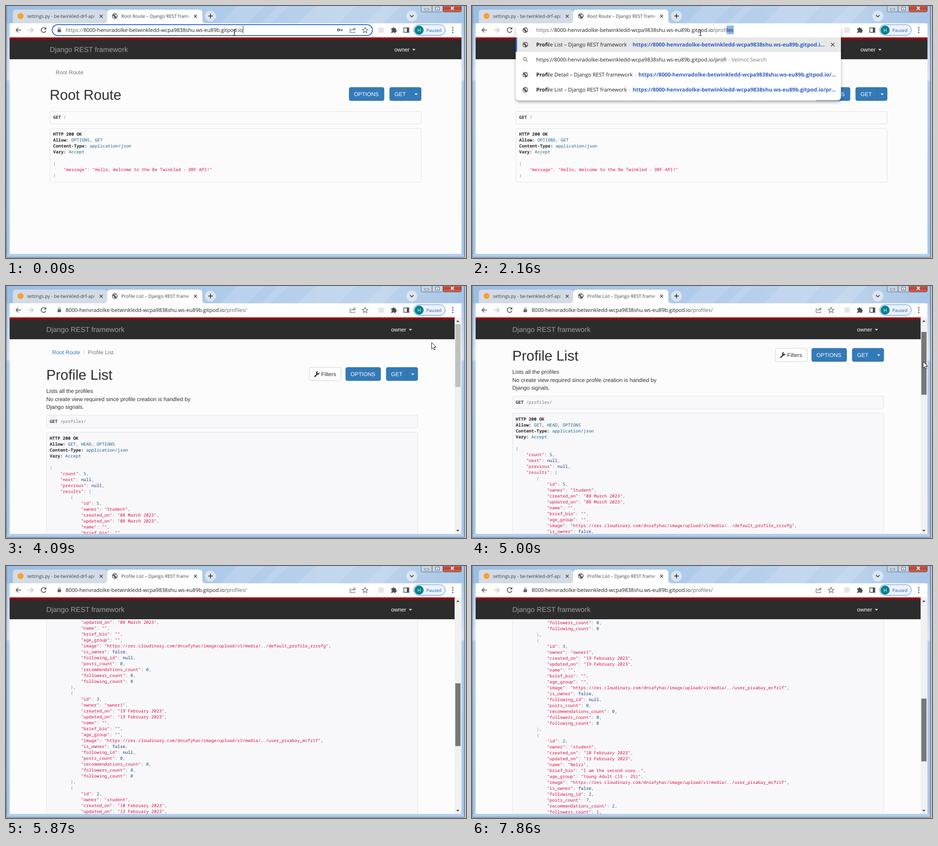
An HTML page for the animation above (8 s loop, 1010 px wide and 554 px high).

```html
<!DOCTYPE html>
<html lang="en">
<head>
<meta charset="utf-8">
<title>Profile API walkthrough</title>
<style>
html, body { margin: 0; width: 100%; height: 100%; overflow: hidden; background: #fcfcfc; }
svg { display: block; }
text { white-space: pre; text-rendering: geometricPrecision; }
.ui { font-family: "Open Sans", "Noto Sans", sans-serif; }
.web { font-family: "Liberation Sans", Arial, sans-serif; }
.mono { font-family: "Noto Sans Mono", "DejaVu Sans Mono", monospace; font-size: 9.54px; }
.b { font-weight: 700; }
.str { fill: #dd1144; }
.num { fill: #195f91; }
.kwd { fill: #1e347b; }
.pun { fill: #8a9292; }
.sep { fill: #66626a; }
.line { fill: none; stroke: #4a4d51; stroke-width: 1.6; }
.thin { fill: none; stroke: #5f6368; stroke-width: 1.2; }
#drop { filter: drop-shadow(0 4px 3px rgba(0, 0, 0, .3)); }
</style>
</head>
<body>
<svg id="stage" width="1010" height="554" viewBox="0 0 1010 554"></svg>
<script>
const LOOP = 8000;
const HOST = '8000-henvradolke-betwinkledd-wcpa9838shu.ws-eu89b.gitpod.io';
const TOP = 84, THUMB = 138, RATIO = 3.453, END = 1063.5;

// [time, typed path]
const TYPING = [[0, ''], [800, '/'], [1300, '/p'], [1420, '/pr'], [1670, '/pro'], [1970, '/prof'],
  [2160, '/profi'], [2380, '/profil'], [2500, '/profile'], [2740, '/profiles']];
// [time, scroll, thumb top if it runs ahead]
const SCROLL = [[0, 0], [4820, 4], [4885, 14], [4950, 26], [5000, 42, 101], [5060, 80], [5130, 150],
  [5210, 230], [5380, 300], [5440, 370], [5510, 440], [5570, 500], [5870, 600.5], [5940, 680],
  [6010, 750], [6080, 820], [6150, 870], [6380, 980], [6450, END], [7700, 930], [7780, 820], [7860, 716.5]];
// [time, x, y]
const POINTER = [[3960, 640, 75], [4030, 800, 105], [4090, 934, 124], [4330, 950, 132],
  [4400, 975, 142], [4460, 990, 149]];
const DROP_AT = 800, LOAD_AT = 3050, READY_AT = 3280, HOVER_AT = 4460, DRAG_AT = 4820, LEAVE_AT = 5380;

const $ = id => document.getElementById(id);
const at = (table, t) => table.reduce((hit, row) => row[0] <= t ? row : hit, table[0]);
const show = (id, on) => $(id).setAttribute('visibility', on ? 'inherit' : 'hidden');
const text = (cls, x, y, size, fill, s, more = '') =>
  `<text class="${cls}" x="${x}" y="${y}" font-size="${size}" fill="${fill}" ${more}>${s}</text>`;
const rect = (x, y, w, h, fill, more = '') =>
  `<rect x="${x}" y="${y}" width="${w}" height="${h}" fill="${fill}" ${more}/>`;
const path = (d, cls = 'line', more = '') => `<path class="${cls}" d="${d}" ${more}/>`;
const span = (cls, s) => `<tspan class="${cls}">${s}</tspan>`;
const tint = (fill, s) => `<tspan fill="${fill}">${s}</tspan>`;
const cross = (x, y, r, more) => path(`M${x - r} ${y - r}l${2 * r} ${2 * r}m0 ${-2 * r}l${-2 * r} ${2 * r}`, 'line', more);
const caret = (x, y) => `<path d="M${x} ${y}h7l-3.5 3.6z" fill="#fff"/>`;
const globe = (x, y, id = '') => `<g ${id && `id="${id}"`} transform="translate(${x} ${y})">
  <circle r="6" fill="#55595e"/><path fill="#fff" d="M-4.6-1.2L-1.5 1.8-.6 4.8C-3 4.6-4.8 2-4.6-1.2z
  M-2.6-3.6L.8-4.8.9-3-.8-1.6 1.8-.2 2.2 1.6 3.6 2.2C5 .2 4.6-2.6 2.8-4L2.2-2.2z"/></g>`;

function chrome() {
  let s = `<defs>
    <linearGradient id="sky"><stop offset="0" stop-color="#9dbde3"/><stop offset=".45" stop-color="#aecaea"/>
      <stop offset=".8" stop-color="#bed4ec"/><stop offset="1" stop-color="#a8c5e6"/></linearGradient>
    <linearGradient id="side" x2="0" y2="1"><stop offset="0" stop-color="#a6c3e5"/><stop offset=".29" stop-color="#d8e6f5"/>
      <stop offset=".3" stop-color="#b3cdea"/><stop offset="1" stop-color="#a9c7e8"/></linearGradient>
    <linearGradient id="red" x2="0" y2="1"><stop offset="0" stop-color="#d98b7e"/><stop offset=".5" stop-color="#bd4034"/>
      <stop offset="1" stop-color="#cf6a55"/></linearGradient>
    <linearGradient id="fade1"><stop offset="0" stop-color="#d3dbe5" stop-opacity="0"/><stop offset="1" stop-color="#d3dbe5"/></linearGradient>
    <linearGradient id="fade2"><stop offset="0" stop-color="#fff" stop-opacity="0"/><stop offset="1" stop-color="#fff"/></linearGradient>
    <clipPath id="view"><rect x="8" y="117" width="992" height="428"/></clipPath>
  </defs>`;
  s += rect(0, 0, 1010, 554, 'url(#side)') + rect(0, 0, 1010, 38, 'url(#sky)');
  for (const [x, w] of [[470, 60], [560, 22], [640, 90], [790, 40]])
    s += `<path d="M${x} 38l38-38h${w}l-38 38z" fill="#fff" opacity=".12"/>`;
  s += rect(0, 545, 1010, 9, '#b3cdea') + rect(1, 0, 1, 552, '#5d6c80') + rect(1006, 0, 1, 552, '#3f4d60') +
    rect(1, 552, 1006, 1, '#4d5c70') + rect(1007, 0, 3, 554, '#b9c6d6') + rect(0, 553, 1010, 1, '#d5dde6');
  // window buttons
  s += rect(911.5, -4, 48, 17, '#c3d3e6', 'rx="3" stroke="#5d6f86"') + rect(959.5, -4, 40, 17, 'url(#red)', 'rx="3" stroke="#5b3a3a"') +
    path('M935.5 0v13', 'thin') + rect(919, 6, 9, 3, '#fff', 'stroke="#4b5665" stroke-width=".8"') +
    rect(943.5, 2.5, 8, 6.5, '#fff', 'stroke="#4b5665"') + rect(946, 5, 3, 2, '#7d8da1') +
    cross(980, 5, 3, 'style="stroke:#fff;stroke-width:2.2"');
  // tabs
  s += `<path d="M15 38V15q0-7 7-7H215q7 0 7 7V38z" fill="#d3dbe5"/>
    <path d="M215 38q7 0 7-7V15q0-7 7-7H424q7 0 7 7V31q0 7 7 7z" fill="#fff"/>
    <circle cx="32" cy="22" r="6.5" fill="#f7a030"/>` +
    text('ui', 46, 26, 10.15, '#3c4043', 'settings.py - be-twinkled-drf-api') + rect(190, 12, 10, 20, 'url(#fade1)') +
    cross(209, 22.5, 3.2) + globe(239, 22, 'tabGlobe') +
    `<path id="spin" d="M233 22a6 6 0 0 1 6-6" fill="none" stroke="#8ab4f0" stroke-width="1.6"/>` +
    text('ui', 253, 26, 10.15, '#3c4043', '', 'id="tabTitle"') + rect(397, 12, 8, 20, 'url(#fade2)') +
    rect(405, 12, 25, 20, '#fff') + cross(416, 22.5, 3.2) +
    '<circle cx="449" cy="22" r="12" fill="#dbe5f1"/>' + path('M449 17v10M444 22h10', 'line', 'style="stroke:#222"') +
    '<circle cx="891" cy="22" r="12" fill="#dce6f2"/>' + path('M887 20l4 4 4-4', 'line', 'style="stroke:#333"');
  // toolbar
  s += rect(8, 38, 992, 31, '#fff') + path('M33 53H22m5-5l-5 5 5 5') +
    path('M48.5 53h11m-5-5l5 5-5 5', 'line', 'style="stroke:#b9bbbd"') +
    `<g id="reload">${path('M87 50a5.3 5.3 0 1 0 .6 4.4')}<path d="M88.5 46.5v5h-5z" fill="#4a4d51"/></g>` +
    `<g id="stop">${cross(82, 53, 4.3)}</g>`;
  s += rect(101.5, 41, 703, 24, '#fff', 'rx="12" stroke="#2a6fd2" stroke-width="2" id="ring"') +
    `<g id="lock">${rect(113.2, 51.5, 7.6, 6, '#5f6368', 'rx="1"')}${path('M115 52v-2a2 2 0 0 1 4 0v2', 'thin')}</g>
    <g id="info">${path('M111.5 53a5.5 5.5 0 1 0 11 0a5.5 5.5 0 1 0-11 0M117 52v4M117 49.5v1.3', 'thin')}</g>` +
    text('ui', 131, 57, 11.52, '#5f6368', '', 'id="url"') + rect(520, 43, 1, 17, '#222', 'id="caret"') +
    `<g id="key"><circle cx="730" cy="52.5" r="2.3" class="line"/>${path('M732.5 52.5h7m-2 0v3')}</g>` +
    path('M758 50.5h-2.5v8h10v-2.5M758.5 55c.5-3.5 3-4.5 7-4.5M763 47.5l4 3-4 3', 'thin') +
    path('M788.5 47l1.8 4 4.3.4-3.3 2.9 1 4.3-3.8-2.3-3.8 2.3 1-4.3-3.3-2.9 4.3-.4z', 'thin') +
    rect(817.5, 47, 12, 12, '#e6e6e6', 'rx="2"') +
    `<path fill="#4a4d51" d="M846 49h3a2 2 0 1 1 4 0h3v3.5a2 2 0 1 1 0 4V59h-3.5a1.8 1.8 0 0 0-3.5 0H846v-3a1.8 1.8 0 0 0 0-3.6z"/>` +
    rect(873.5, 48, 11, 10, 'none', 'stroke="#4a4d51" stroke-width="1.5"') + rect(880, 48, 4.5, 10, '#4a4d51') +
    rect(895, 41, 69.5, 23.5, '#ecf2fc', 'rx="11.8" stroke="#4a80d0"') +
    '<circle cx="907" cy="53" r="10" fill="#00838f"/>' + text('ui', 907, 57, 10.5, '#fff', 'H', 'text-anchor="middle"') +
    text('ui', 923, 56.5, 9.7, '#2a5db0', 'Paused');
  for (const y of [48, 53, 58]) s += `<circle cx="981" cy="${y}" r="1.4" fill="#4a4d51"/>`;
  return s;
}

const button = (x, w, label) => rect(x + .5, 179, w, 29, '#337ab7', 'rx="3.5" stroke="#3075b0"') +
  text('web', x + 11, 198, 12.1, '#fff', label);
const box = (y, h, fill) => rect(96.5, y + .5, 815, h, fill, 'rx="3.5" stroke="#e1e1e8"');
const code = (y, s) => `<text class="mono" fill="#48484c" x="103.5" y="${y}">${s}</text>`;
const paint = s => s.replace(/("[^"]*")|(\d+)|(true|false|null)|([,:])|([{}[\]])/g, (m, a, b, c, d) =>
  span(a ? 'str' : b ? 'num' : c ? 'kwd' : d ? 'sep' : 'pun', m));
const header = (k, v) => tint('#222', span('b', k + ':')) + ' ' + span('num', v);

function body(title, y, allow, json, route, height, fill) {
  const lines = [tint('#222', span('b', 'HTTP 200 OK')), header('Allow', allow),
    header('Content-Type', 'application/json'), header('Vary', 'Accept'), '', ...json.map(paint)];
  return text('web', 96, 206, 31.1, '#2f2f2f', title) + button(753, 76.5, 'OPTIONS') + button(842, 69, 'GET') +
    rect(889.5, 179.5, 1, 28, '#2e6da4') + caret(897, 192.5) +
    box(y, 28, fill) + code(y + 17.2, tint('#333', span('b', 'GET')) + ' ' + tint('#777', route)) +
    box(y + 37.5, height, fill) + lines.map((l, i) => code(y + 54.3 + i * 13, l)).join('');
}

function profile(id, owner, made, changed, name, bio, age, image, own, follow, counts) {
  const q = s => `"${s}"`;
  const fields = { id, owner: q(owner), created_on: q(made + ' 2023'), updated_on: q(changed + ' 2023'), name: q(name),
    brief_bio: q(bio), age_group: q(age),
    image: q('https://res.cloudinary.com/dnsafyhac/image/upload/v1/media/' + image),
    is_owner: own, following_id: follow, posts_count: counts[0], recommendations_count: counts[1],
    followers_count: counts[2], following_count: counts[3] };
  const rows = Object.entries(fields).map(([k, v]) => `${' '.repeat(12)}"${k}": ${v}`);
  return ['        {', ...rows.map((r, i) => i < rows.length - 1 ? r + ',' : r), id > 1 ? '        },' : '        }'];
}

function pages() {
  const none = [0, 0, 0, 0], blank = '../default_profile_rzzofg', pic = 'user_pixabay_mcfz1f';
  const march = '08 March', feb = '10 February', late = '19 February';
  const list = ['{', '    "count": 5,', '    "next": null,', '    "previous": null,', '    "results": [',
    ...profile(5, 'Student', march, march, '', '', '', blank, false, null, none),
    ...profile(4, 'Novice', march, march, '', '', '', blank, false, null, none),
    ...profile(3, 'owner1', late, late, '', '', '', '../' + pic, false, null, none),
    ...profile(2, 'student', feb, '13 February', 'Nelvi', 'I am the second user..', 'Young Adult (19 - 25)',
      '../' + pic, false, 2, [7, 2, 1, 1]),
    ...profile(1, 'owner', feb, feb, 'Henvra', 'I am the creator of this app.. I am seeking to be uplifted..:)',
      '26 - 40', 'images/' + pic, true, null, [2, 1, 1, 1]),
    '    ]', '}'];
  const hello = ['{', '    "message": "Hello, Welcome to the Be Twinkled - DRF API!"', '}'];
  const notes = ['Lists all the profiles', 'No create view required since profile creation is handled by', 'Django signals.'];
  return rect(8, 69, 992, 476, '#fcfcfc') + `<g clip-path="url(#view)">
    <g id="root">${text('web', 109, 150, 12.1, '#777', 'Root Route')}${body('Root Route', 231, 'OPTIONS, GET', hello, '/', 118.5, '#fbfbfb')}</g>
    <g id="list">${text('web', 109, 150, 12.1, '#337ab7', `Root Route${tint('#ccc', '  /  ')}${tint('#777', 'Profile List')}`)}
      ${rect(673.5, 179, 70, 29, '#fff', 'rx="3.5" stroke="#ccc"')}
      <path d="M685.5 199l5-5" stroke="#333" stroke-width="2.6" stroke-linecap="round"/>
      <path d="M693 187.5l-2 2 .5 2 2 .5 2-2a3.8 3.8 0 1 1-2.5-2.5z" fill="#333"/>
      ${text('web', 699.5, 198, 12.1, '#333', 'Filters')}
      ${notes.map((n, i) => text('web', 96, 235.3 + i * 17.3, 12.1, '#333', n)).join('')}
      ${body('Profile List', 283.5, 'GET, HEAD, OPTIONS', list, '/profiles/', 1211.5, '#f8f8fa')}</g></g>` +
    rect(8, 73, 992, 44, '#2c2c2c') + rect(8, 69, 992, 4.3, '#a30000') +
    `<g id="nav">${text('web', 96, 100.5, 15.55, '#9d9d9d', 'Django REST framework')}
      ${text('web', 853, 99.6, 12.1, '#fff', 'owner')}${caret(892, 94.5)}</g>
    <g id="bar">${rect(985, 69, 15, 476, '#f1f1f1')}<path d="M988.5 79h7l-3.5-4z" fill="#505050"/>
      <path id="down" d="M988.5 536h7l-3.5 4z"/>${rect(986.5, TOP, 11.5, THUMB, '#c1c1c1', 'id="thumb"')}</g>`;
}

const PLUS = `<g id="drop"><path id="sheet" fill="#fff"/><g id="rows"></g>${globe(117, 53)}
  <rect id="mark" y="43" height="19" fill="#8fb6ee"/>${text('ui', 141, 57, 11.52, '#5f6368', '', 'id="typed"')}</g>`;
const POINTERS = `<g id="beam">${path('M498.5 52.5q3 0 3 1.5v9.5q0 1.5-3 1.5M504.5 52.5q-3 0-3 1.5v9.5q0 1.5 3 1.5M500 59h3',
  'thin', 'style="stroke:#222"')}</g>
  <path id="arrow" d="M0 0v14.5l3.3-3.2 2.2 5.2 2.3-1-2.2-5h4.5z" fill="#fff" stroke="#111"/>`;

// everything in the open address box for one typed path
function suggest(typed) {
  const word = typed.slice(1), rest = word && 'profiles'.slice(word.length);
  const hits = 'profile'.startsWith(word) ? word.length : 0;
  const row = (name, tail) => span('b', name.slice(0, hits)) + name.slice(hits) + ' – Django REST framework' +
    `<tspan fill="#777" dx="1"> - </tspan><tspan class="b" fill="#2a5fc4" font-size="11.68" dx="2">https://${HOST.slice(0, -1)}${tail}</tspan>`;
  const search = `<tspan font-size="11.52">https://${HOST}${typed}</tspan>` + tint('#777', '<tspan dx="1"> - </tspan>Velmot Search');
  const rows = word
    ? [row('Profile List', '…'), search, row('Profile Detail', 'o/…'), row('Profile List', 'o/pr…')]
    : [row('Root Route', '…'), search, row('Profile List', 'o/pr…'), row('Profile Detail', 'o/…'), row('Profile List', 'o/pr…')];
  const h = 75.5 + rows.length * 33;
  $('sheet').setAttribute('d', `M96 49q0-8 8-8H802q8 0 8 8V${h - 8}q0 8-8 8H104q-8 0-8-8z`);
  $('rows').innerHTML = rect(96, 69, 714, 32, '#e8e8e8') + rect(96, 69, 3, 32, '#2a6fd2', 'rx="1"') + cross(792, 85, 4) +
    rows.map((r, i) => (i === 1
      ? path('M113 116.5a3.2 3.2 0 1 0 6.4 0a3.2 3.2 0 1 0-6.4 0M118.6 119l3.2 3.2', 'thin')
      : globe(117, 85 + i * 33)) + text('ui', 141, 89 + i * 33, 11.56, '#202124', r)).join('');
  const el = $('typed'), base = `https://${HOST}${typed}`;
  el.innerHTML = 'https://' + tint('#202124', HOST) + typed + tint('#202124', rest);
  const x = el.getSubStringLength(0, base.length);
  $('mark').setAttribute('x', 141 + x);
  $('mark').setAttribute('width', rest ? el.getSubStringLength(base.length, rest.length) + 1 : 0);
}

$('stage').innerHTML = chrome() + pages() + PLUS + POINTERS;

let lastTyped, lastPhase;
function draw(t) {
  const open = t >= DROP_AT && t < LOAD_AT, loading = t >= LOAD_AT && t < READY_AT, ready = t >= READY_AT;
  const phase = ready ? 2 : t >= LOAD_AT ? 1 : 0;
  if (phase !== lastPhase) {
    lastPhase = phase;
    $('tabTitle').textContent = (ready ? 'Profile List' : 'Root Route') + ' – Django REST framework';
    $('url').innerHTML = (phase ? '' : 'https://') + tint('#202124', HOST) + ['', '/profiles', '/profiles/'][phase];
    $('nav').setAttribute('transform', `translate(${ready ? -7.5 : 0} 0)`);
  }
  const typed = at(TYPING, t)[1];
  if (open && typed !== lastTyped) suggest(lastTyped = typed);
  show('drop', open);
  show('ring', t < DROP_AT);
  show('key', t < DROP_AT);
  show('caret', t < 490);
  show('lock', !loading);
  show('info', loading);
  show('stop', loading);
  show('reload', !loading);
  show('spin', loading);
  show('tabGlobe', !loading);
  $('spin').setAttribute('transform', `rotate(${(t - 3110) * .4} 239 22)`);
  show('root', !ready);
  show('list', ready);
  show('bar', ready);

  const [, scroll, ahead] = at(SCROLL, t), top = ahead || TOP + scroll / RATIO;
  $('list').setAttribute('transform', `translate(-7.5 ${-scroll})`);
  $('thumb').setAttribute('y', top);
  $('thumb').setAttribute('fill', t >= DRAG_AT ? '#787878' : t >= HOVER_AT ? '#a8a8a8' : '#c1c1c1');
  $('down').setAttribute('fill', scroll === END ? '#a3a3a3' : '#505050');

  const [from, x, y] = at(POINTER, t);
  show('beam', t < from);
  show('arrow', t >= from && t < LEAVE_AT);
  $('arrow').setAttribute('transform', `translate(${x + .5} ${t >= DRAG_AT ? top + 65 : y})`);
}

function tick() {
  draw(performance.now() % LOOP);
  requestAnimationFrame(tick);
}
tick();
</script>
</body>
</html>
```
